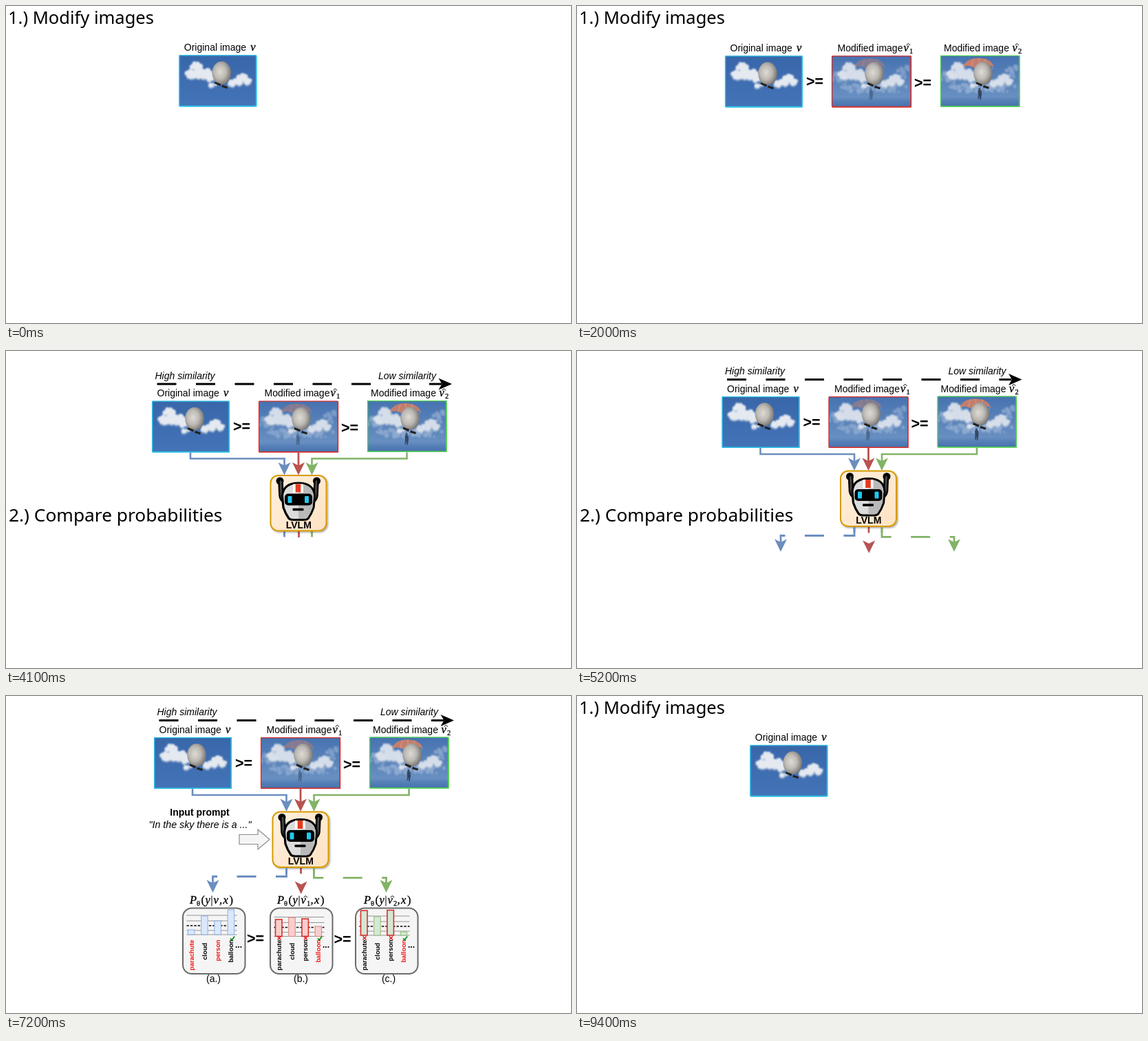
Animation, 821 px wide and 461 px high, one loop 9600 ms. Source, as an HTML page:

```html
<!DOCTYPE html>
<html lang="en">
<head>
<meta charset="utf-8">
<title>Modify images, compare probabilities</title>
<style>
  html, body { margin: 0; width: 100%; height: 100%; overflow: hidden; background: #fff; }
  #stage { display: block; width: 821px; height: 461px; }
  text { font: 14px "Liberation Sans", Arial, sans-serif; fill: #000; white-space: pre; }
  .title { font: 25.5px "Noto Sans", sans-serif; }
  #title2 { font-size: 26.3px; }
  .it { font-style: italic; }
  .b { font-weight: bold; }
  .math { font: italic 16.5px "Liberation Serif", serif; stroke: #000; stroke-width: .3px; }
  .sub { font: 10.5px "Liberation Serif", serif; stroke: #000; stroke-width: .25px; }
  .ge { font-size: 21.5px; font-weight: bold; }
  .word { font-size: 9.3px; font-weight: bold; text-anchor: end; }
  .note { font-size: 9.45px; text-anchor: middle; }
  .mid { text-anchor: middle; }
</style>
</head>
<body>
<svg id="stage" viewBox="0 0 821 461" xmlns="http://www.w3.org/2000/svg">
  <defs>
    <linearGradient id="sky" x2="0" y2="1"><stop stop-color="#3866a9"/><stop offset="1" stop-color="#4474b8"/></linearGradient>
    <linearGradient id="haze" x2="0" y2="1">
      <stop stop-color="#4672b0"/><stop offset=".8" stop-color="#688fc1"/>
      <stop offset=".88" stop-color="#557fb6"/><stop offset="1" stop-color="#4671ad"/>
    </linearGradient>
    <radialGradient id="ball" cx=".42" cy=".45" r=".62">
      <stop stop-color="#dedbd5"/><stop offset=".5" stop-color="#bdbab5"/><stop offset="1" stop-color="#6f6d6a"/>
    </radialGradient>
    <linearGradient id="cream" x2="1" y2="1"><stop stop-color="#fff0de"/><stop offset="1" stop-color="#ffe2c2"/></linearGradient>
    <filter id="soft"><feGaussianBlur stdDeviation=".9"/></filter>
    <filter id="shade" x="-20%" y="-20%" width="140%" height="140%">
      <feDropShadow dx="1.5" dy="1.5" stdDeviation="1" flood-opacity=".35"/>
    </filter>
  </defs>
  <text class="title" id="title1" x="3" y="25.5">1.) Modify images</text>
  <text class="title" id="title2" x="4" y="247.5">2.) Compare probabilities</text>
  <g id="figure"></g>
</svg>
<script>
const BLUE = '#6c8ebf', RED = '#b85450', GREEN = '#82b366';

const text = (x, y, s, cls = '', more = '') => `<text x="${x}" y="${y}" class="${cls}" ${more}>${s}</text>`;
const rect = (x, y, w, h, more) => `<rect x="${x}" y="${y}" width="${w}" height="${h}" ${more}/>`;
const line = (d, color, width, more = '') =>
  `<path d="${d}" fill="none" stroke="${color}" stroke-width="${width}" ${more}/>`;
const fill = (d, color, more = '') => `<path d="${d}" fill="${color}" ${more}/>`;

// Notched arrowhead pointing down, tip at x, y
const headDown = (x, y, color) => fill(`M${x} ${y}l-9 -18.5l9 4.5l9 -4.5z`, color);

// Italic v, with a hat and an index when given
const vee = (x, y, index) => text(x, y, 'v', 'math') + (index
  ? line(`M${x + 4} ${y - 9}l2.8 -2.5l2.8 2.5`, '#000', 1) + text(x + 8.5, y + 3, index, 'sub') : '');

function seeded(seed) {
  return () => (seed = (seed * 16807) % 2147483647) / 2147483647;
}

function puffs(blobs, color, opacity, drop = 0) {
  const rnd = seeded(77);
  let out = '';
  for (const [cx, cy, rx, ry, n] of blobs) {
    for (let i = 0; i < n; i++) {
      const a = rnd() * 6.283, d = Math.sqrt(rnd());
      const x = cx + Math.cos(a) * d * rx, y = cy + Math.sin(a) * d * ry + drop;
      out += `<circle cx="${x.toFixed(1)}" cy="${y.toFixed(1)}" r="${(1.3 + rnd() * 2.4).toFixed(1)}"/>`;
    }
  }
  return `<g fill="${color}" opacity="${opacity}" filter="url(#soft)">${out}</g>`;
}

// Centre, radii and number of puffs
const CLOUD = [[26, 17, 7, 6, 24], [17, 28, 8, 5, 24], [34, 27, 12, 7, 40], [45, 31, 7, 6, 18], [50, 43, 5, 2, 5],
               [92, 33, 6, 5, 20], [82, 40, 9, 4, 22], [98, 38, 7, 4, 14]];
const MIST = [[12, 34, 12, 11, 24], [36, 48, 26, 6, 24], [88, 47, 26, 6, 26], [104, 24, 8, 11, 12]];

// strength: how far the parachutist has appeared, 0..1
function photo(x, y, w, border, strength) {
  const h = 75;
  let s = rect(0, 0, w, h, `fill="url(#${strength ? 'haze' : 'sky'})"`);
  if (strength) s += puffs(MIST, '#b3c6e0', 0.4 + strength * 0.15);
  s += puffs(CLOUD, '#aebdd4', 0.6, 2) + puffs(CLOUD, '#eef1f5', strength ? 0.75 : 0.92);
  if (strength) {
    s += `<g opacity="${strength}">`
      + fill('M33 17Q36 5 54 4Q74 4 78 17Q72 13 66 18Q58 13 49 18Q41 13 33 17Z', '#d9805f')
      + line('M45 16L48 5M56 15V4M67 16L65 5', '#f0a98c', 0.8)
      + line('M35 17L56 50M77 17L58 50', '#dfe5ee', 0.4)
      + '</g>';
  }
  s += '<ellipse cx="62" cy="26" rx="13.8" ry="16.8" fill="url(#ball)"/>'
    + line('M52 40L60.5 43.5M62.5 45L70.5 47.5', '#25221f', 3);
  if (strength) {
    s += `<g opacity="${strength + 0.1}" fill="#33435c"><circle cx="57" cy="49" r="1.7"/>`
      + '<path d="M54.5 50.5h5l.6 6l-1.3 8h-1.4l-.5 -6l-1 5h-1.4l.6 -7z"/></g>';
  }
  return `<svg x="${x}" y="${y}" width="${w}" height="${h}">${s}</svg>`
    + rect(x + 0.6, y + 0.6, w - 1.2, h - 1.2, `rx="1.5" fill="none" stroke="${border}" stroke-width="1.4"`)
    + line(`M${x + 1} ${y + h - 0.7}H${x + w - 0.7}V${y + 1}`, border, 1.6);
}

function robot() {
  const arms = 'M402 177L403 198Q404 204 409 206M454 177L453 198Q452 204 447 206';
  return rect(387.5, 168.5, 81, 80.5, 'rx="11" fill="url(#cream)" stroke="#d79b00" stroke-width="2" filter="url(#shade)"')
    + line(arms, '#000', 7.5, 'stroke-linecap="round"')
    + '<circle cx="401" cy="176.5" r="5.5"/><circle cx="454.5" cy="176.5" r="5.5"/>'
    + line(arms, '#4a4a4a', 2.6, 'stroke-linecap="round"')
    + fill('M404.5 198Q406 179.5 428 179.5Q450 179.5 451.5 198L450 215Q447 224 442 231Q440 233 436 233H420Q416 233 414 231Q409 224 406 215Z',
        '#dcdcdc', 'stroke="#000" stroke-width="3.2" stroke-linejoin="round"')
    + fill('M428 181Q448.5 181 450 198L448.5 215Q446 223 441 230Q439 231.5 436 231.5H428Z', '#b9b9b9')
    + rect(420, 181, 15, 12.5, 'fill="#fff"')
    + rect(423.7, 181, 7.6, 12, 'fill="#e8391c"')
    + rect(408, 195, 40, 17, 'rx="5"')
    + rect(412.5, 198.5, 6, 10, 'rx="1" fill="#22c8ee"') + rect(437, 198.5, 6, 10, 'rx="1" fill="#22c8ee"')
    + rect(419.5, 216.2, 16, 3.6, 'rx="1"')
    + text(428.3, 245, 'LVLM', 'b mid');
}

const WORDS = ['parachute', 'cloud', 'person', 'balloon'];

// wrong: columns marked with a cross; red: columns with a red word
function chart({ x, base, tops, color, light, wrong, red }) {
  let s = rect(x, 308.5, 90.5, 95.5, 'rx="13" fill="#f5f5f5" stroke="#6b6b6b" stroke-width="2"');
  for (const up of [28, 20, 6, 0]) s += line(`M${x + 5.5} ${base - up}h73`, '#8a8a8a', 0.9);
  s += line(`M${x + 5.5} ${base - 13}h73`, '#000', 1.4, 'stroke-dasharray="3.4 2"');
  WORDS.forEach((word, i) => {
    const left = x + 7.5 + i * 19.2, mid = left + 5, bad = wrong.includes(i);
    s += rect(left, tops[i], 9.5, base - tops[i],
      `fill="${light}" stroke="${bad ? '#d9302c' : color}" stroke-width="${bad ? 1.6 : 1}"`);
    const end = i === 1 ? 359 : 354.5;
    s += text(0, 0, word, 'word', `transform="translate(${mid + 3} ${end}) rotate(-90)"`
      + (red.includes(i) ? ' style="fill:#f01515"' : ''));
    if (bad) s += line(`M${mid - 2} 349.5l5 5m0 -5l-5 5`, '#d81e1e', 1.5);
    if (i === 3) s += line(`M${mid - 1} 352.5l2 2.5l4 -5.5`, '#118a11', 1.8);
  });
  return s + text(x + 76, 366, '...', 'b', 'style="font-size:12px"');
}

const formula = (x, index) => text(x, 302, 'P', 'math') + text(x + 10, 305, 'θ', 'sub it')
  + text(x + 16.5, 302, '(', 'math', 'style="font-style:normal"') + text(x + 22.5, 302, 'y', 'math')
  + line(`M${x + 32} 290.5v15`, '#000', 1) + vee(x + 34.5, 302, index)
  + [[',', 0], ['x', 5.5], [')', 14.5]].map(([c, dx]) =>
      text(x + (index ? 48.5 : 43) + dx, 302, c, 'math', c === ')' ? 'style="font-style:normal"' : '')).join('');

const blockArrow = x => fill(`M${x} 201.5h27v-7.5l17 14.5l-17 14.5v-7.5h-27z`, '#f5f5f5', 'stroke="#8c8c8c" stroke-width="1.2"');

const dashes = 'stroke-dasharray="28 28.5"';

// Each layer joins the figure one step after the one before it
const layers = [
  text(222.5, 53.8, 'Original image') + vee(319, 53.8) + photo(215, 60, 113, '#2bc4e8', 0),

  text(333, 104.5, '&gt;=', 'ge') + text(378.5, 53.8, 'Modified image') + vee(474.5, 53.8, '1')
    + photo(370, 60, 116, '#d8302f', 0.4),

  text(490, 106.5, '&gt;=', 'ge') + text(533, 53.8, 'Modified image') + vee(632.5, 53.8, '2')
    + photo(528, 59.5, 115.5, '#4fcf50', 0.85),

  text(219.5, 28.3, 'High similarity', 'it') + text(544, 28.3, 'Low similarity', 'it')
    + line('M222.5 35.4H636', '#000', 3, dashes) + fill('M651 35.4l-19.5 -8.5l5 8.5l-5 8.5z', '#000'),

  line('M271 135V144H407.5V156', BLUE, 2.6) + headDown(407.5, 168, BLUE)
    + line('M585.5 135V144H447.5V156', GREEN, 2.6) + headDown(447.5, 168, GREEN)
    + line('M428 135V156', RED, 2.8) + headDown(428, 168, RED)
    + line('M407.5 249V258', BLUE, 2.8) + line('M447.5 249V258', GREEN, 2.8) + line('M428.5 249V258.5', RED, 2.8)
    + robot(),

  line('M407.5 250V262.5H300.5V274', BLUE, 2.8, dashes) + headDown(300.5, 286, BLUE)
    + line('M447.5 250V264.3H552.5V274', GREEN, 2.8, dashes) + headDown(552.5, 286, GREEN)
    + headDown(428.7, 288, RED),

  formula(267) + formula(394, '1') + formula(520, '2')
    + chart({ x: 257, base: 347, tops: [340, 320, 327, 311], color: '#8fb0dc', light: '#dae8fc', wrong: [], red: [0, 2] })
    + chart({ x: 384, base: 349.5, tops: [325, 322, 324, 335], color: '#d98481', light: '#f8cecc', wrong: [0, 2], red: [3] })
    + chart({ x: 508, base: 348, tops: [312, 321, 311.5, 343], color: '#8fbf78', light: '#d5e8d4', wrong: [0, 2], red: [3] })
    + text(350, 359.5, '&gt;=', 'ge') + text(476.5, 360.5, '&gt;=', 'ge')
    + text(301.5, 415.8, '(a.)', 'mid') + text(428.5, 415.8, '(b.)', 'mid') + text(556, 415.8, '(c.)', 'mid'),

  text(281.5, 174, 'Input prompt', 'b mid')
    + text(282, 192, '"In the sky there is a ..."', 'it mid', 'style="font-size:14.2px"') + blockArrow(339),

  blockArrow(473)
    + fill('M538 191Q542 182 562 186Q582 180 593 189Q613 188 609 200Q623 208 606 214Q600 225 584 219'
        + 'Q570 226 556 219Q538 225 532 214Q514 210 526 202Q518 191 538 191Z', '#fff', 'stroke="#111" stroke-width="1.2"')
    + rect(529.5, 193.5, 77, 18.5, 'fill="#0be024"')
    + text(567.5, 207.5, '"... balloon"', 'b it mid')
    + text(559, 236.7, 'Unlikely tokens generated from ordinally', 'note')
    + text(559, 254, 'modified images are penalized.', 'note')
];

// start in ms, figure offset, title
const steps = [
  [0, 36.3, 11.3, 1], [700, 0, 12.3, 1], [1800, 0, 12.3, 1], [2900, -3, 25, 0], [4000, -3, 12.5, 2],
  [5000, -4.5, 6, 2], [6200, -4, 0, 2], [7200, 0, 0, 0], [8300, 0, 0, 0]
];
const LOOP = 9600, RESTART = 9400;

const figure = document.getElementById('figure');
figure.innerHTML = layers.map(s => `<g>${s}</g>`).join('');
const groups = [...figure.children];
const titles = [1, 2].map(n => document.getElementById('title' + n));
const show = (el, on) => el.setAttribute('visibility', on ? 'visible' : 'hidden');

let current = -1;
function draw(now) {
  const t = now % LOOP;
  const index = t >= RESTART ? 0 : steps.findLastIndex(step => step[0] <= t);
  if (index !== current) {
    current = index;
    const [, dx, dy, title] = steps[index];
    figure.setAttribute('transform', `translate(${dx} ${dy})`);
    groups.forEach((g, i) => show(g, i <= index));
    titles.forEach((el, i) => show(el, title === i + 1));
  }
}

const start = performance.now();
function tick() {
  draw(Math.max(0, performance.now() - start));
  requestAnimationFrame(tick);
}
tick();
</script>
</body>
</html>
```
